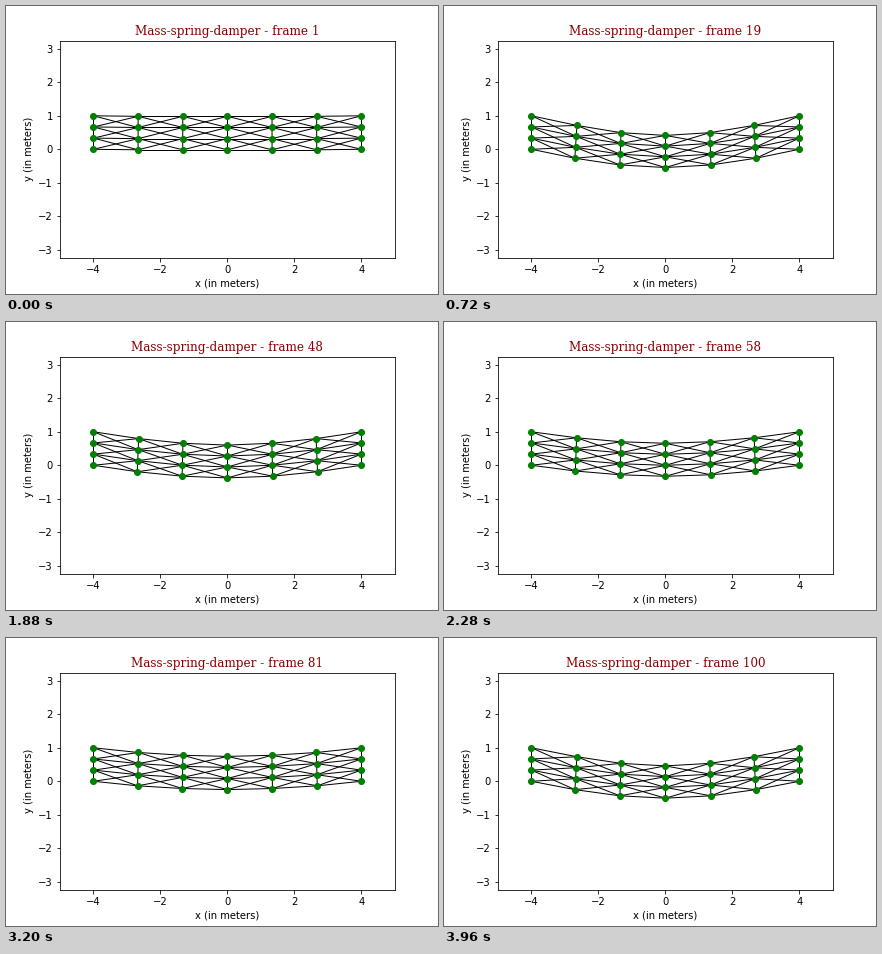
A matplotlib script for the animation above (4000 ms loop, 432x288 px).

```python
import matplotlib.pyplot as plt
import numpy as np
from matplotlib.animation import FuncAnimation

FRAMES, INTERVAL = 100, 40
COLS, ROWS = 7, 4

x0, y0 = np.meshgrid(np.linspace(-4, 4, COLS), np.linspace(0, 1, ROWS))
level = y0.copy()                       # 0 at the bottom row, 1 at the top
dist = np.abs(np.arange(COLS) - COLS // 2)


def sag(n):
    """Drop of the bottom centre mass: a damped, stiffening oscillation."""
    t = n + 0.9
    phase = 2 * np.pi * t / 26.7
    amp = 0.464 * np.exp(-0.0073 * t)
    skew = 0.25 * amp ** 2
    return 0.518 - amp * np.cos(phase) - skew * (1.5 - 0.5 * np.cos(2 * phase))


def column_drop(n):
    """Drop of each column; at first they all fall together."""
    d = sag(n) + 0.004 * np.exp(-n)
    free1, free2 = np.exp(-(n / 7) ** 2), np.exp(-(n / 5) ** 2)
    one = free1 * d + (1 - free1) * (0.85 * d + 0.005)
    two = free2 * d + (1 - free2) * (0.445 * d + 0.025)
    return d, np.array([d, one, two, 0.0])[dist]


def positions(n):
    d, drop = column_drop(n)
    squeeze = 0.14 * d * drop
    y = y0 - drop - squeeze * level
    # bending tilts the columns: bottoms move outwards, tops inwards
    low = np.array([0, -0.05, -0.07, 0])[dist]
    high = np.array([0, 0.015, 0.045, 0])[dist]
    x = x0 - np.sign(x0) * d * (low + (high - low) * level)
    return x, y


def springs():
    pairs = []
    for r in range(ROWS):
        for c in range(COLS):
            for dr, dc in ((0, 1), (1, 0), (1, 1), (1, -1)):
                if r + dr < ROWS and 0 <= c + dc < COLS:
                    pairs.append(((r, c), (r + dr, c + dc)))
    return pairs


fig = plt.figure(figsize=(6, 4), dpi=72, facecolor="white")
ax = fig.add_axes([0.125, 0.125, 0.775, 0.755])
half = 5 * (0.755 * 288) / (0.775 * 432)
ax.set_xlim(-5, 5)
ax.set_ylim(-half, half)
ax.set_xticks(range(-4, 5, 2))
ax.set_yticks(range(-3, 4))
ax.set_xlabel("x (in meters)")
ax.set_ylabel("y (in meters)")
title = ax.set_title("", family="DejaVu Serif", color="darkred", size=12)

links = springs()
lines = [ax.plot([], [], "k-", lw=1)[0] for _ in links]
masses, = ax.plot([], [], "o", color="green", ms=6, zorder=3)


def draw(n):
    x, y = positions(n)
    for line, (a, b) in zip(lines, links):
        line.set_data([x[a], x[b]], [y[a], y[b]])
    masses.set_data(x.ravel(), y.ravel())
    title.set_text(f"Mass-spring-damper - frame {n + 1}")
    return [*lines, masses, title]


anim = FuncAnimation(fig, draw, frames=FRAMES, interval=INTERVAL,
                     init_func=lambda: draw(0), repeat=True, repeat_delay=0)
plt.show()
```
